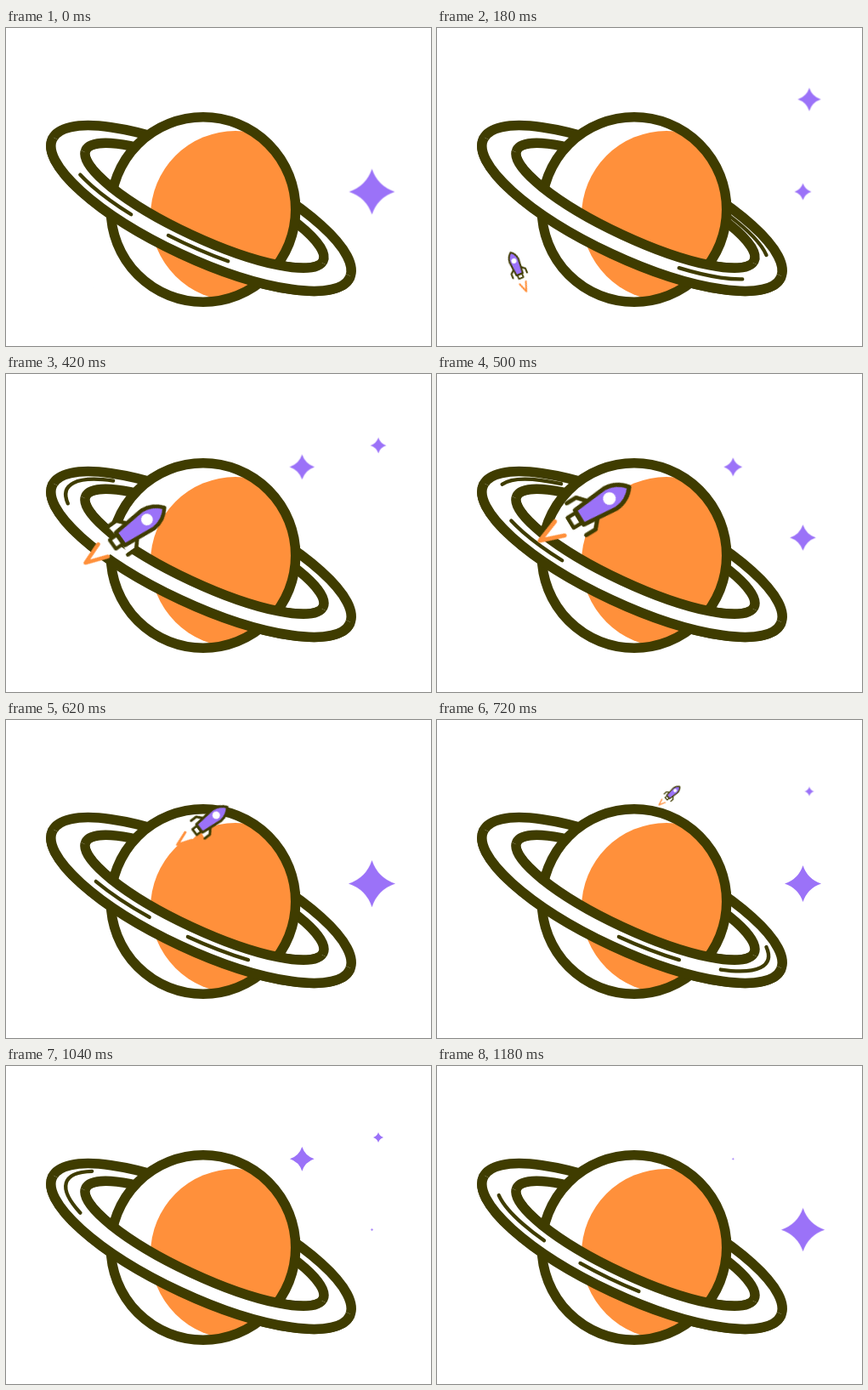
Animation, 500 px wide and 374 px high, one loop 1.2 s. Source, as an HTML page:

```html
<!DOCTYPE html>
<html lang="en">
<head>
<meta charset="utf-8">
<title>Ringed planet</title>
<style>
  html, body { margin: 0; width: 100%; height: 100%; overflow: hidden; background: #fff; }
  svg { display: block; width: 500px; height: 374px; }
  .line { stroke: #3f3c00; stroke-linecap: round; stroke-linejoin: round; }
  .white { fill: #fff; }
  .purple { fill: #9b72f8; }

  .star { animation: twinkle 600ms infinite; }
  @keyframes twinkle {
    0% { transform: scale(0); animation-timing-function: cubic-bezier(.333, .667, .667, 1); }
    33.33% { transform: scale(1); animation-timing-function: cubic-bezier(.333, 0, .667, .333); }
    63.67%, 100% { transform: scale(0); }
  }

  .streak {
    fill: none;
    stroke-width: 4.3;
    stroke-dasharray: 76 2000;
    animation: orbit 600ms linear infinite;
  }
  @keyframes orbit {
    from { stroke-dashoffset: 76; }
    to { stroke-dashoffset: -682; }
  }

  .rocket { animation: fly 1200ms linear infinite; }
  @keyframes fly {
    0% { transform: translate(104px, 306px) rotate(-24deg) scale(0); }
    15% { transform: translate(93px, 280px) rotate(-23deg) scale(.4); }
    20.83% { transform: translate(96px, 247px) rotate(10deg) scale(.56); }
    26.67% { transform: translate(114px, 215px) rotate(42deg) scale(.71); }
    34.17% { transform: translate(150px, 183px) rotate(54deg) scale(.91); }
    41.67% { transform: translate(190px, 155px) rotate(58.6deg) scale(1); }
    46.67% { transform: translate(216px, 136px) rotate(56deg) scale(.82); }
    51.67% { transform: translate(240px, 118px) rotate(52.5deg) scale(.6); }
    60% { transform: translate(277px, 86px) rotate(48deg) scale(.27); }
    66.67%, 100% { transform: translate(302px, 64px) rotate(45deg) scale(0); }
  }
</style>
</head>
<body>
<svg viewBox="0 0 500 374">
  <defs>
    <clipPath id="disc"><circle cx="232" cy="213.5" r="106"/></clipPath>
    <clipPath id="front"><rect x="-210" y="0" width="420" height="100"/></clipPath>
    <path id="ring" class="line white" stroke-width="11.5" fill-rule="evenodd"
      d="M-193.7 2a193 58.7 0 1 0 386 0a193 58.7 0 1 0 -386 0z
         M-152.5 -2.6a154 37.7 0 1 0 308 0a154 37.7 0 1 0 -308 0z"/>
    <path id="spark" class="purple" d="M0 -1Q.25 -.25 1 0Q.25 .25 0 1Q-.25 .25 -1 0Q-.25 -.25 0 -1z"/>
    <path id="fin" class="line white" stroke-width="5" d="M12 9L22 18L22 31L16 33" stroke="none"/>
  </defs>

  <g transform="translate(231 210.5) rotate(25)"><use href="#ring"/></g>

  <circle class="white" cx="232" cy="213.5" r="108.7"/>
  <circle cx="270" cy="221" r="100" fill="#ff903b" clip-path="url(#disc)"/>
  <circle class="line" cx="232" cy="213.5" r="108.7" fill="none" stroke-width="11.5"/>

  <g transform="translate(231 210.5) rotate(25)"><use href="#ring" clip-path="url(#front)"/></g>

  <g transform="translate(230 209.5) rotate(25)">
    <path class="line streak" style="animation-delay:-155ms" d="M-110 -37.3A175 48 0 1 0 108 -37.8"/>
    <path class="line streak" style="animation-delay:-255ms" d="M-110 -37.3A175 48 0 1 0 108 -37.8"/>
  </g>

  <g transform="translate(430.5 192.5) scale(27.7)"><use href="#spark" class="star" style="animation-delay:-165ms"/></g>
  <g transform="translate(438 84) scale(19.3)"><use href="#spark" class="star" style="animation-delay:-510ms"/></g>
  <g transform="translate(348.3 109.3) scale(14.8)"><use href="#spark" class="star" style="animation-delay:-392ms"/></g>

  <g class="rocket">
    <path class="white" d="M-7 38L-11 54L-1 81L9 53L7 38z"/>
    <path d="M-11 54L-1 81L9 53" fill="none" stroke="#ff903b" stroke-width="5" stroke-linecap="round" stroke-linejoin="round"/>
    <path class="white" d="M12 8L22 18V31L10 29H-10L-22 31V18L-12 8z"/>
    <path class="line" d="M13 10L22 18V31M-13 10L-22 18V31" fill="none" stroke-width="5"/>
    <rect class="line white" x="-7" y="28" width="14" height="11" stroke-width="4.5"/>
    <path class="line purple" stroke-width="5" d="M0 -42Q13 -32 14 -16L10 27H-10L-14 -16Q-13 -32 0 -42z"/>
    <circle class="white" cx="-.5" cy="-15" r="7.5"/>
  </g>
</svg>
</body>
</html>
```
